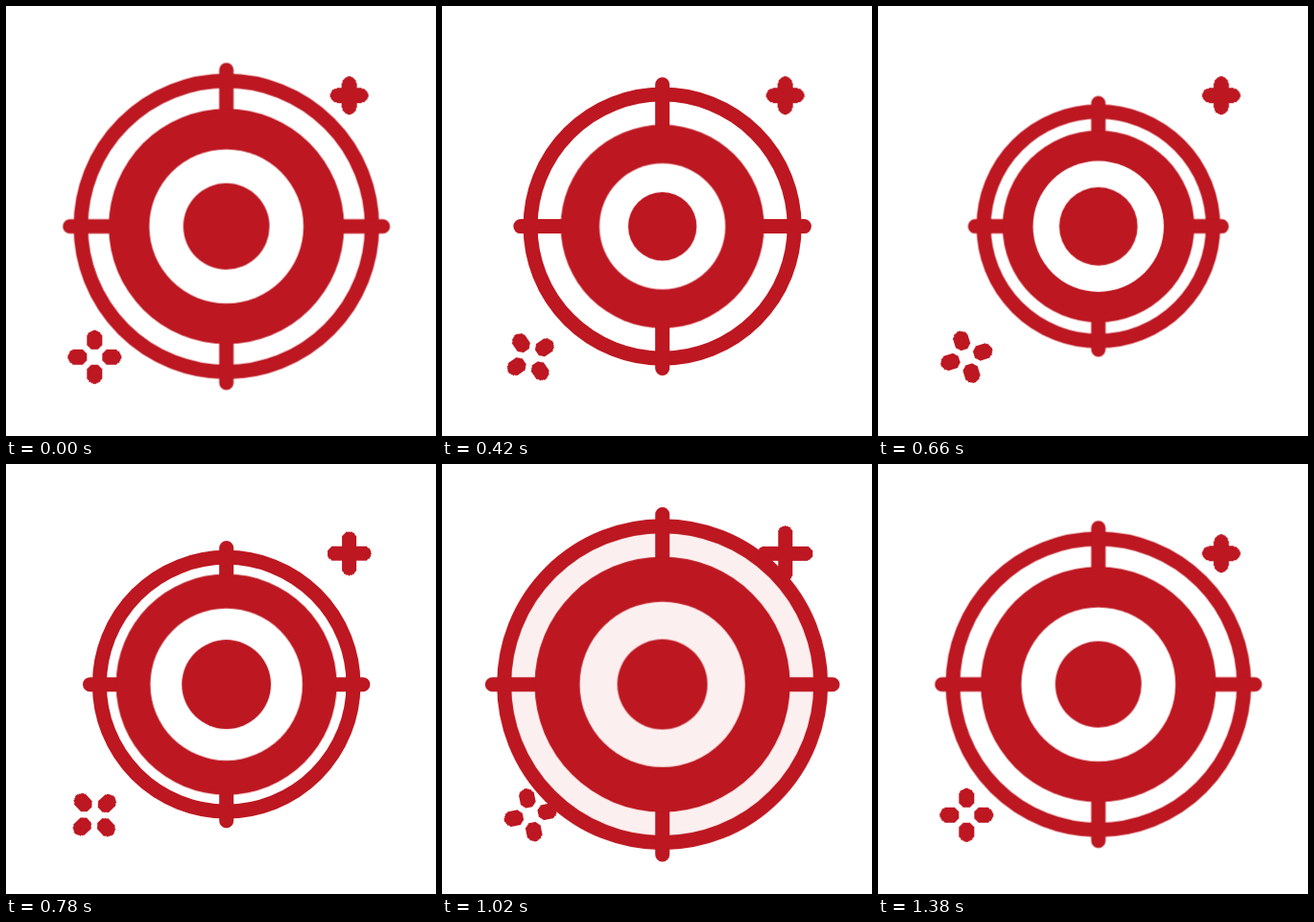
An HTML page that plays this animation: 448 by 448 pixels, repeating every 1500 ms.

```html
<!DOCTYPE html>
<html lang="en">
<head>
<meta charset="utf-8">
<title>Crosshair pulse</title>
<style>
  html, body {
    margin: 0;
    width: 100%;
    height: 100%;
    overflow: hidden;
    background: #fff;
  }
  svg { display: block; width: 100vw; height: 100vh; }

  .red { fill: #bd1721; }
  .pale { fill: #fff; animation: tint 1.5s step-end infinite; }
  .line {
    stroke: #bd1721;
    stroke-width: 15;
    stroke-linecap: round;
  }
  .line * { vector-effect: non-scaling-stroke; }

  .move { animation: 1.5s cubic-bezier(.33, 0, .67, 1) infinite; }
  .frame { animation-name: frame; }
  .disc { animation-name: disc; }
  .gap { animation-name: gap; }
  .bull { animation-name: bull; }
  .plus { animation-name: plus; stroke-width: 15.3; }
  .dots { animation-name: swing; stroke-width: 16.3; }
  .plus, .dots { shape-rendering: crispEdges; }

  /* Each layer shrinks, overshoots and settles, from the middle outwards. */
  @keyframes bull {
    0%, 2%, 76.7%, 100% { transform: scale(1); }
    32% { transform: scale(.784); }
    59.6% { transform: scale(1.09); }
  }
  @keyframes gap {
    0%, 8.1%, 80.3%, 100% { transform: scale(1); }
    35.7% { transform: scale(.774); }
    62.5% { transform: scale(1.095); }
  }
  @keyframes disc {
    0%, 12.5%, 87%, 100% { transform: scale(1); }
    39% { transform: scale(.784); }
    65% { transform: scale(1.09); }
  }
  @keyframes frame {
    0%, 15.9%, 92%, 100% { transform: scale(1); }
    42.6% { transform: scale(.785); }
    69.5% { transform: scale(1.09); }
  }
  @keyframes plus {
    0%, 44%, 92%, 100% { transform: scale(1); }
    64.9% { transform: scale(1.775); }
  }
  @keyframes swing {
    0%, 7.5%, 92%, 100% { transform: rotate(0deg); }
    39.3% { transform: rotate(78deg); }
    72.5% { transform: rotate(-16deg); }
  }
  @keyframes tint {
    0%, 84%, 100% { fill: #fff; }
    68% { fill: #fcefef; }
  }
</style>
</head>
<body>
<svg viewBox="0 0 448 448">
  <g transform="translate(229.6 229.6)">
    <g class="line move frame">
      <circle class="pale" r="151.7"/>
      <path d="M0-105V-163M0 105V163M-105 0H-163M105 0H163"/>
    </g>
    <circle class="red move disc" r="122.6"/>
    <g class="move gap"><circle class="pale" r="80.3"/></g>
    <circle class="red move bull" r="44.9"/>
  </g>
  <g transform="translate(357.6 93.2)">
    <g class="line move plus"><path d="M-12.2 0H12.2M0-12.2V12.2"/></g>
  </g>
  <g transform="translate(92.3 365.7)">
    <g class="line move dots">
      <path d="M0-15.6V-19.8M0 15.6V19.8M-15.6 0H-19.8M15.6 0H19.8"/>
    </g>
  </g>
</svg>
</body>
</html>
```
